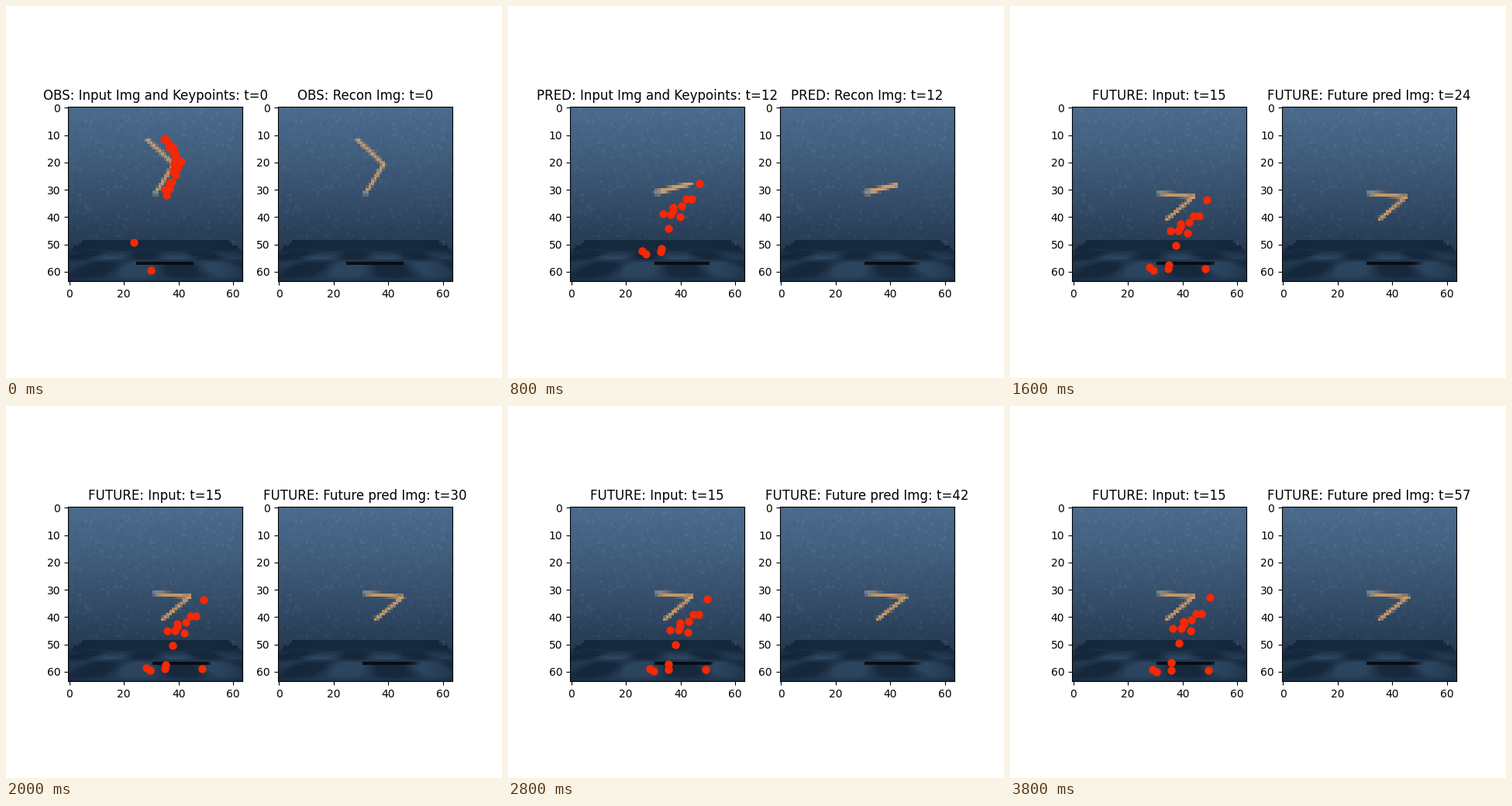
Write a matplotlib script that moves like this. It is 640 px wide and 480 px high and loops after 4 s.

```python
import numpy as np
import matplotlib.pyplot as plt
from matplotlib.animation import FuncAnimation

N = 64
FRAMES, STEP = 20, 3
BASE = np.array([31.5, 31.4])
UPPER, FORE = 12.5, 13.0
SKIN, HUB, SHADOW = (208, 159, 108), (92, 136, 180), (7, 11, 18)

# Where the keypoints come to rest; the last one joins after t=18
REST = np.array([(49.5, 33.6), (46.6, 39.5), (44.6, 39.5), (42.9, 41.8),
                 (39.8, 42.4), (39.8, 43.5), (39, 45), (36.1, 44.9),
                 (42.4, 45.8), (38.1, 50.3), (35.5, 57.4), (35.3, 58.8),
                 (28.5, 58.5), (29.9, 59.4), (48.9, 58.8)])

Y, X = np.mgrid[0:N, 0:N].astype(float)


def blend(img, color, alpha):
    return img + (np.asarray(color) - img) * alpha[..., None]


def room():
    """Speckled blue wall above a dim checkered floor."""
    rng = np.random.default_rng(4)
    top, low = np.array([75, 107, 141]), np.array([41, 62, 87])
    wall = top + (low - top) * (Y / 48)[..., None] ** 1.2
    wall += (rng.normal(0, 1.2, (N, N)) + 7 * (rng.random((N, N)) > 0.95))[..., None]

    depth = np.maximum(Y - 41, 1)
    u = np.sin(np.pi * (33 - X) / depth / 0.85)
    v = np.sin(np.pi * 45 / depth)
    light = np.clip(0.5 + u * v, 0, 1) * np.clip((Y - 51) / 4, 0, 1)
    floor = blend(np.full((N, N, 3), (22.0, 40, 60)), (48, 75, 102), light * 0.85)
    floor = blend(floor, (20, 36, 54), np.clip((np.abs(X - 31.5) - 22) / 22, 0, 0.4))

    on_floor = (Y >= 49) & (np.abs(X - 31.5) <= 27 + 1.4 * (Y - 49))
    return np.where(on_floor[..., None], floor, wall)


ROOM = room()


def limb(img, a, b):
    d = b - a
    s = np.clip(((X - a[0]) * d[0] + (Y - a[1]) * d[1]) / (d @ d), 0, 1)
    dist = np.hypot(X - a[0] - s * d[0], Y - a[1] - s * d[1])
    return blend(img, SKIN, np.clip(1.3 - 1.25 * dist, 0, 0.9))


def scene(elbow, tip, shadow, fade=0.5):
    lo, hi = shadow
    bar = (Y == 57) * (X > lo) * np.clip((hi - X) / fade, 0, 1)
    img = blend(ROOM, SHADOW, bar * 0.95)
    img = limb(img, elbow, tip)
    img = limb(img, BASE, elbow)
    hub = (np.abs(X - 31.5) < 1) & (np.abs(Y - 31) < 0.8)
    img = blend(img, HUB, hub * 0.75)
    return np.clip(img, 0, 255).astype(np.uint8)


def polar(length, deg):
    a = np.radians(deg)
    return length * np.array([np.cos(a), -np.sin(a)])


def true_pose(t):
    """The arm swings down with growing speed and is held from t=15."""
    t = min(t, 15)
    elbow = BASE + polar(UPPER, 58.2 - 0.5 * t - 0.25 * t * t)
    tip = elbow + polar(FORE, 137 + 1.05 * t + 0.3 * t * t)
    return elbow, tip, (np.interp(t, [6, 12], [24.5, 30.5]), elbow[0] + 7.4)


def recon_pose(t):
    """Like the true pose, but the predicted upper arm shrinks, then stretches."""
    elbow, tip, (lo, hi) = true_pose(t)
    reach = np.interp(t, [6, 12, 15], [1, 0.87, 0.95])
    if t > 15:
        reach += 0.17 * (1 - np.exp((15 - t) / 8))
    elbow = BASE + (elbow - BASE) * reach
    return elbow, tip + (max(0, min(t - 12, 1)), 0), (lo, hi + 0.5)


def observed_points(t):
    """Dots strung along the moving arm, plus two on the floor."""
    rng = np.random.default_rng(7)
    bend = np.array([(34.7, 11.3), (41.2, 19.2), (35, 32)])
    bend = bend + t / 6 * np.array([(0, 7.5), (2.3, 2.7), (2, -1.2)])
    n = 24 - 2 * min(t, 6)
    s = np.linspace(0, 2, n) ** (1 - 0.07 * t)
    s *= 2 / s[-1]
    chain = np.c_[[np.interp(s, range(3), axis) for axis in bend.T]].T
    chain += rng.normal(0, 0.8, chain.shape) * max(0.2, 1 - t / 6)
    floor = [(23.7 + 0.22 * t, 49.2 + 0.23 * t), (29.8 + 0.07 * t, 59.5 - 0.17 * t)]
    return np.vstack([chain, floor])


def predicted_points(t):
    """Dots drop quickly towards rest, then creep on."""
    lag = t - 12
    pts = REST[:None if t > 18 else -1]
    fall = np.array([2.6 * np.exp(-lag / 8), 6 * np.exp(-lag / 2)])
    creep = max(0, t - 30) / 27 * np.c_[np.full(len(pts), 0.45),
                                        0.7 * np.sign(pts[:, 1] - 57.5)]
    return pts - fall + creep


def keypoints(t):
    return observed_points(t) if t < 12 else predicted_points(t)


def titles(t):
    if t > 15:
        return "FUTURE: Input: t=15", f"FUTURE: Future pred Img: t={t}"
    phase = "OBS" if t < 9 else "PRED"
    return (f"{phase}: Input Img and Keypoints: t={t}",
            f"{phase}: Recon Img: t={t}")


fig, (left, right) = plt.subplots(1, 2, figsize=(6.4, 4.8), dpi=100)
view_in = left.imshow(scene(*true_pose(0)))
view_out = right.imshow(scene(*recon_pose(0)))
left.autoscale(False)
dots = left.scatter(*keypoints(0).T, s=36, c="#ff2600",
                    edgecolors="#ee2a0a", linewidths=1.5)


def draw(k):
    t = k * STEP
    view_in.set_data(scene(*true_pose(t)))
    view_out.set_data(scene(*recon_pose(t), fade=0.5 + min(t, 12) / 3))
    dots.set_offsets(keypoints(t))
    for ax, text in zip((left, right), titles(t)):
        ax.set_title(text)
    return view_in, view_out, dots


anim = FuncAnimation(fig, draw, frames=FRAMES, interval=200,
                     repeat=True, repeat_delay=0, blit=False)
plt.show()
```
